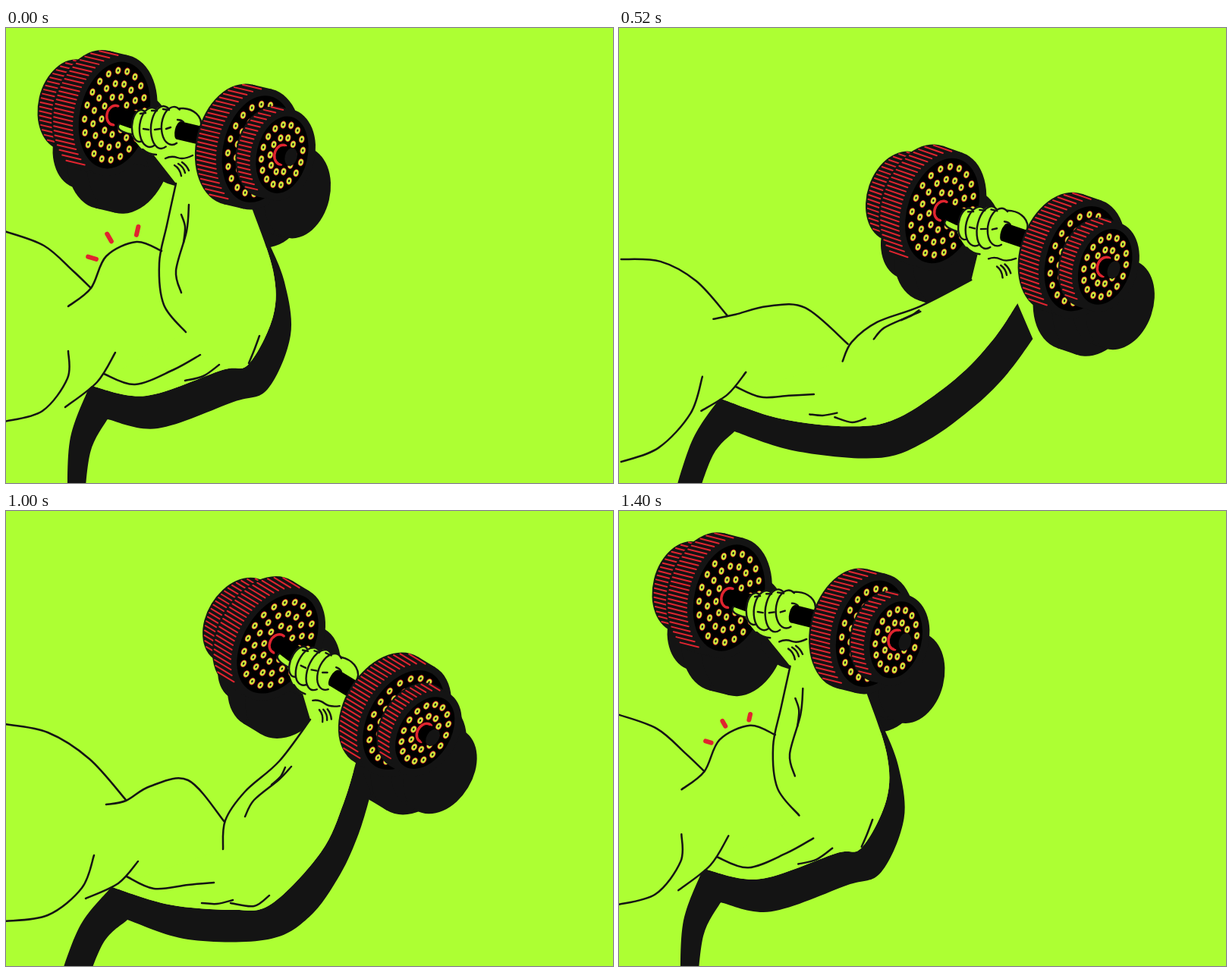
An HTML page with a canvas that plays this animation: 800x600 px, repeating every 1440 ms.

```html
<!DOCTYPE html>
<html lang="en">
<head>
<meta charset="utf-8">
<title>Dumbbell curl</title>
<style>
html, body { margin: 0; width: 100%; height: 100%; overflow: hidden; background: #adff33; }
canvas { display: block; }
</style>
</head>
<body>
<canvas id="stage" width="800" height="600"></canvas>
<script>
const ctx = document.getElementById('stage').getContext('2d');
const LIME = '#adff33', DARK = '#141414', RED = '#e0242f', DOT = '#cbf03a';
const LOOP = 1440, STEP = 40, REST_ANGLE = 13.3;

// The swing of the dumbbell; bend runs from 0 (flexed) over 1 (curling) to 2 (extended).
// Drive tells how hard the motion passes through the key.
const swing = [
  { time: 0, drive: 1, x: 143, y: 115, angle: REST_ANGLE, bend: 0 },
  { time: 320, drive: 1.4, x: 246, y: 129, angle: 12.2, bend: .55 },
  { time: 520, drive: .85, x: 426, y: 241, angle: 19, bend: 1.55 },
  { time: 840, drive: .4, x: 473.5, y: 301, angle: 26, bend: 2 },
  { time: 1000, drive: 1.6, x: 358, y: 175, angle: 31.2, bend: 1 },
  { time: 1240, drive: .7, x: 174.5, y: 117, angle: 18, bend: .17 },
  { time: 1400, drive: 1, x: 145, y: 114.5, angle: 14.1, bend: .01 },
];
const [flexedKey, , , extendedKey, curlingKey] = swing;
const gripPath = [flexedKey, curlingKey, extendedKey].map(k => [k.x, k.y]);

// Each curve has a flexed, a curling and an extended shape, as x,y pairs
const chest = [
  [-2, 268, 50, 287, 88, 320, 112, 343],
  [-2, 281, 55, 292, 110, 327, 158, 381],
  [-2, 313, 55, 322, 105, 352, 145, 397]];
const biceps = [
  [82, 367, 112, 343, 132, 301, 172, 282, 205, 294],
  [132, 387, 158, 382, 190, 363, 240, 355, 288, 410],
  [132, 399, 165, 394, 215, 390, 265, 400, 328, 442]];
const forearm = [
  [237, 401, 208, 365, 202, 310, 212, 260, 224, 205],
  [286, 446, 289, 408, 315, 370, 360, 330, 401, 275],
  [317, 454, 335, 438, 370, 419, 430, 409, 508, 385]];
const longCrease = [
  [241, 233, 238, 268, 224, 320, 231, 349],
  [376, 337, 360, 354, 327, 381, 315, 403],
  [430, 424, 410, 424, 383, 427, 368, 436]];
const shortCrease = [
  [231, 246, 236, 262, 234, 283], [368, 338, 362, 350, 350, 361], [433, 420, 420, 423, 405, 425]];
const flank = [
  [82, 426, 81, 462, 48, 505, -2, 519],
  [116, 454, 100, 497, 55, 533, -2, 541],
  [116, 479, 98, 528, 50, 571, -2, 586]];
const armpit = [
  [144, 428, 120, 467, 78, 500], [174, 462, 148, 491, 105, 511], [177, 467, 155, 496, 122, 514]];
const triceps = [
  [129, 456, 170, 470, 220, 451, 256, 431],
  [159, 482, 195, 498, 240, 493, 274, 490],
  [164, 485, 195, 497, 225, 498, 258, 497]];
const underCrease = [
  [236, 465, 260, 459, 281, 444], [258, 517, 278, 518, 299, 513], [261, 523, 276, 525, 293, 523]];
const elbow = [
  [334, 406, 327, 425, 320, 442], [347, 507, 327, 521, 296, 517], [322, 541, 306, 539, 290, 530]];
const underArm = [
  [113, 472, 185, 485, 285, 451, 320, 443, 352, 380, 352, 320, 325, 240],
  [140, 496, 215, 519, 300, 526, 350, 518, 415, 450, 445, 385, 463, 325],
  [143, 502, 225, 531, 320, 543, 390, 528, 470, 488, 530, 444, 568, 400]];
const shadowEdge = [
  [134, 516, 200, 528, 300, 493, 345, 476, 375, 405, 367, 335, 345, 280],
  [160, 539, 240, 565, 345, 565, 400, 535, 440, 480, 465, 425, 481, 372],
  [161, 546, 240, 571, 350, 587, 420, 568, 500, 525, 550, 490, 590, 447]];
const sideLeft = [
  [81, 640, 84, 545, 108, 477], [63, 640, 96, 550, 136, 499], [72, 640, 104, 553, 140, 505]];
const sideRight = [
  [133, 517, 111, 560, 102, 640], [159, 540, 128, 570, 100, 640], [160, 547, 134, 576, 106, 640]];
const lines = [chest, biceps, longCrease, shortCrease, flank, armpit, triceps, underCrease, elbow];

const clamp = (v, low, high) => Math.max(low, Math.min(high, v));

// Cubic interpolation of one property of the swing, with limited overshoot
function swingAt(name, t) {
  const n = swing.length, key = i => swing[(i + n) % n];
  const time = i => key(i).time + LOOP * Math.floor(i / n);
  const rate = i => (key(i + 1)[name] - key(i)[name]) / (time(i + 1) - time(i));
  const velocity = i => {
    const h1 = time(i) - time(i - 1), h2 = time(i + 1) - time(i), d1 = rate(i - 1), d2 = rate(i);
    const limit = 3 * Math.min(Math.abs(d1), Math.abs(d2));
    return clamp(key(i).drive * (h2 * d1 + h1 * d2) / (h1 + h2), -limit, limit);
  };
  const i = swing.filter(k => k.time <= t).length - 1;
  const span = time(i + 1) - time(i), s = (t - time(i)) / span, r = 1 - s;
  return r * r * (1 + 2 * s) * key(i)[name] + s * s * (3 - 2 * s) * key(i + 1)[name] +
    span * s * r * (r * velocity(i) - s * velocity(i + 1));
}

function blend([flexed, curling, extended], bend) {
  const [from, to, s] = bend < 1 ? [flexed, curling, bend] : [curling, extended, bend - 1];
  return from.map((v, i) => v + (to[i] - v) * s);
}

const reversed = p => p.map((_, i) => p[p.length - 2 - i + 2 * (i % 2)]);

// Adds a smooth curve through flat x,y points to the current path
function curve(p) {
  const last = p.length - 2;
  ctx.lineTo(p[0], p[1]);
  for (let i = 0; i < last; i += 2) {
    const a = Math.max(0, i - 2), d = Math.min(last, i + 4);
    const [x1, y1, x2, y2] = p.slice(i, i + 4);
    ctx.bezierCurveTo(x1 + (x2 - p[a]) / 6, y1 + (y2 - p[a + 1]) / 6,
      x2 - (p[d] - x1) / 6, y2 - (p[d + 1] - y1) / 6, x2, y2);
  }
}

function fillCurves(color, ...parts) {
  ctx.beginPath();
  parts.forEach(curve);
  ctx.fillStyle = color;
  ctx.fill();
}

function strokeCurve(p) {
  ctx.beginPath();
  curve(p);
  ctx.stroke();
}

function oval(x, y, rx, ry, color) {
  ctx.beginPath();
  ctx.ellipse(x, y, rx, ry, 0, 0, 7);
  ctx.fillStyle = color;
  ctx.fill();
}

// Plates lie along the bar, measured from the left hub
const big = { rx: 55, ry: 81, depth: 27, rings: [[.84, 20], [.6, 15], [.36, 9]] };
const small = { rx: 43, ry: 61, depth: 18, rings: [[.79, 16], [.46, 10]] };
const plates = [[-41, small], [0, big], [194, big], [227, small]];

function drum(x, { rx, ry, depth }) {
  oval(x - depth, 0, rx, ry, DARK);
  ctx.fillRect(x - depth, -ry, depth, 2 * ry);
  oval(x, 0, rx, ry, DARK);
}

function plate([x, shape]) {
  const { rx, ry, depth, rings } = shape;
  drum(x, shape);
  ctx.beginPath();
  for (let y = 3 - ry; y < ry * .92; y += 5.8) {
    const edge = x - rx * Math.sqrt(1 - (y / ry) ** 2);
    ctx.moveTo(edge - depth + 3, y);
    ctx.lineTo(edge + 1, y);
  }
  ctx.strokeStyle = RED;
  ctx.lineWidth = 2;
  ctx.stroke();
  const fx = rx - 9.5, fy = ry - 9.5;
  oval(x, 0, fx, fy, '#000');
  for (const [size, dots] of rings)
    for (let i = 0; i < dots; i++) {
      const a = (i + .25) / dots * 2 * Math.PI;
      const dx = x + Math.sin(a) * fx * size, dy = -Math.cos(a) * fy * size;
      oval(dx, dy, 3.8, 5.1, RED);
      oval(dx, dy, 3, 4.3, DOT);
      oval(dx, dy, 1.1, 1.7, DARK);
    }
}

function hub(x) {
  ctx.beginPath();
  ctx.ellipse(x, 0, 10, 13, 0, 1.4, 4.9);
  ctx.strokeStyle = RED;
  ctx.lineWidth = 3.5;
  ctx.stroke();
}

function bar(from, to, color = '#000') {
  oval(from, 0, 5, 12, color);
  ctx.fillRect(from, -12, to - from, 24);
}

// The hand is drawn as it stands in the flexed pose
const palm = new Path2D('M149 127C144 133 154 138 165 140C171 152 182 166 196 168L215 180L250 176L258 125L235 106L170 120L166 133Z');
const handLines = new Path2D('M149 127C144 133 154 138 165 140M180 160Q188 167 198 167M210 172Q218 168 226 171T246 168' +
  'M222 181q7 4 9 14M227 179q7 4 9 12M232 177q6 4 9 11');
const knuckles = new Path2D('M177 113l7-1M192 109l7 0M207 107l8 1M181 133l7 1M196 134l7-1M211 133l6-2M226 121q5 0 8 3');
const fingers = [[177, 129, 11, 21], [191, 131, 15, 26], [206, 131, 15, 28], [220, 129, 15, 25]];

function hand() {
  ctx.save();
  ctx.rotate(-REST_ANGLE * Math.PI / 180);
  ctx.translate(-flexedKey.x, -flexedKey.y);
  ctx.strokeStyle = DARK;
  ctx.lineWidth = 2.4;
  ctx.fillStyle = LIME;
  ctx.fill(palm);
  oval(232, 126, 25, 20, LIME);
  ctx.beginPath();
  ctx.ellipse(232, 126, 25, 20, 0, 4, 6.5);
  ctx.stroke();
  for (const f of fingers) {
    oval(...f, LIME);
    ctx.beginPath();
    ctx.ellipse(...f, .08, 1.1, 5.2);
    ctx.stroke();
  }
  ctx.stroke(handLines);
  ctx.stroke(knuckles);
  ctx.restore();
}

const ticks = [[123, 306, -.96, -.28], [141, 285, -.5, -.87], [171, 277, .22, -.97]];

function flexTicks(t) {
  const q = (t + 80) % LOOP / 240;
  if (q <= 0 || q >= 1) return;
  const outer = 22 * (1 - (1 - q) ** 3), inner = 22 * q ** 1.5;
  ctx.strokeStyle = RED;
  ctx.lineWidth = 6;
  ctx.beginPath();
  for (const [x, y, dx, dy] of ticks) {
    ctx.moveTo(x + dx * inner, y + dy * inner);
    ctx.lineTo(x + dx * outer, y + dy * outer);
  }
  ctx.stroke();
}

function draw(t) {
  const [gx, gy, degrees, bend] = ['x', 'y', 'angle', 'bend'].map(name => swingAt(name, t));
  const angle = degrees * Math.PI / 180, turn = (degrees - REST_ANGLE) * Math.PI / 180;
  const onHand = (x, y) => [
    gx + x * Math.cos(turn) - y * Math.sin(turn),
    gy + x * Math.sin(turn) + y * Math.cos(turn)];
  const inGrip = (dx, dy, paint) => {
    ctx.save();
    ctx.translate(gx + dx, gy + dy);
    ctx.rotate(angle);
    paint();
    ctx.restore();
  };

  // On the way down the arm floats up and left while the torso sinks; limb ends follow the grip
  const lift = t < 760 ? Math.sin(Math.PI * t / 760) : 0;
  const drift = [-10 * lift, -13 * lift];
  const [bx, by] = blend(gripPath, bend), gap = [gx - bx, gy - by];
  const pose = (shapes, reach = 0) => {
    const p = blend(shapes, bend);
    return p.map((v, i) => {
      const axis = i % 2, x = p[i - axis];
      const lean = clamp((x - 50) / 90, -.6, 1);
      const follow = reach * ((i - axis) / (p.length - 2)) ** 2;
      return v + drift[axis] * lean * (1 - follow) + gap[axis] * follow;
    });
  };

  ctx.fillStyle = LIME;
  ctx.fillRect(0, 0, 800, 600);
  ctx.lineCap = ctx.lineJoin = 'round';

  inGrip(20, 50, () => {
    plates.forEach(p => drum(...p));
    bar(0, 190, DARK);
    oval(66, 0, 42, 28, DARK);
  });
  const under = pose(underArm, 1), inner = pose(forearm, 1);
  fillCurves(DARK, pose(sideLeft), under, reversed(pose(shadowEdge, 1)), pose(sideRight));
  fillCurves(LIME, inner, onHand(52, 53), onHand(119, 35), reversed(under));

  ctx.strokeStyle = DARK;
  ctx.lineWidth = 2.5;
  strokeCurve(inner);
  lines.forEach(shapes => strokeCurve(pose(shapes)));

  inGrip(0, 0, () => {
    plates.slice(0, 2).forEach(plate);
    hub(0);
    bar(4, 40);
    hand();
    bar(87, 125);
    plates.slice(2).forEach(plate);
    hub(227);
    bar(229, 239);
    oval(239, 0, 8, 12, DARK);
  });
  flexTicks(t);
}

function loop() {
  draw(Math.floor(performance.now() % LOOP / STEP) * STEP);
  requestAnimationFrame(loop);
}
loop();
</script>
</body>
</html>
```
